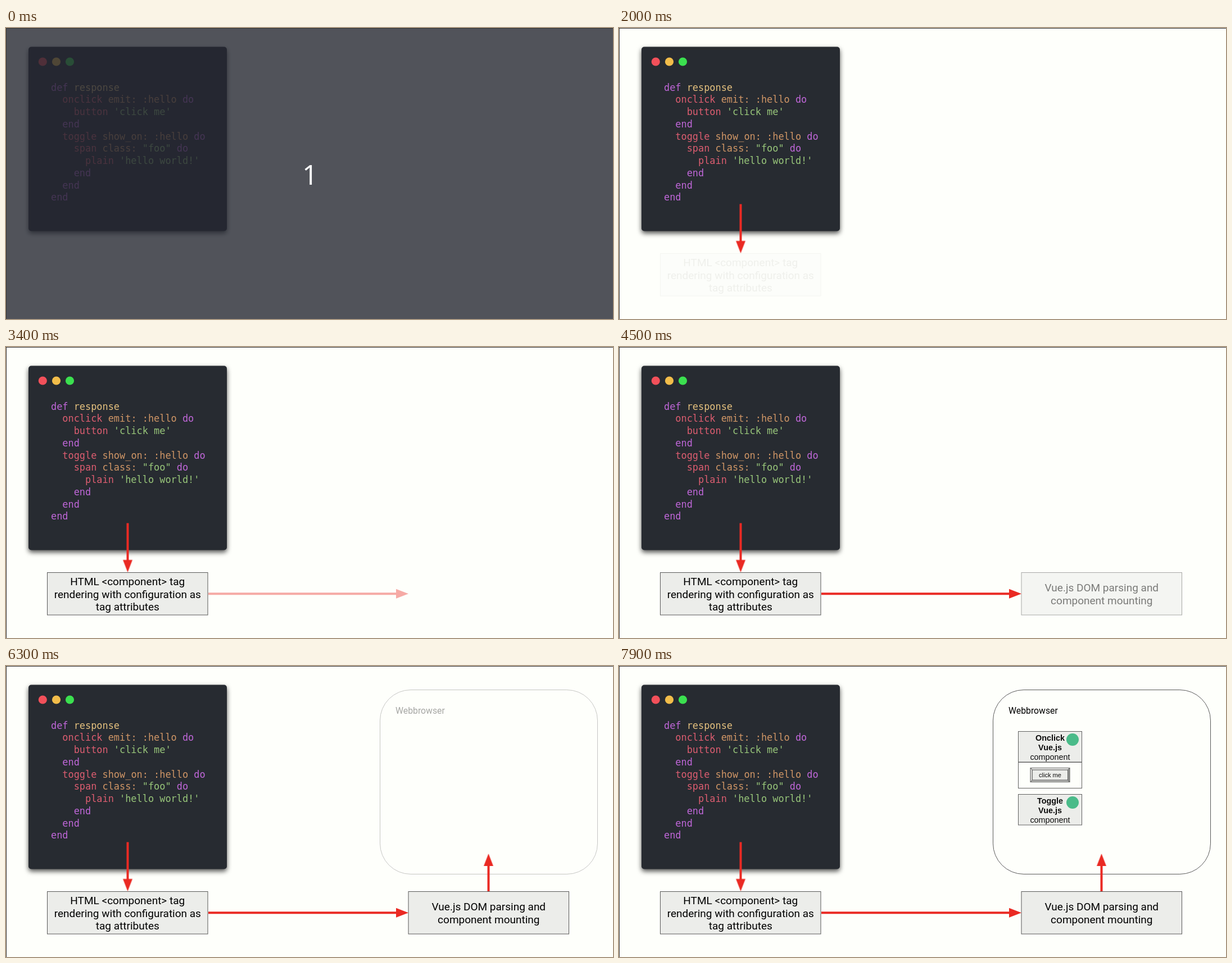
An HTML page that plays this animation: 1080x518 px, repeating every 8 s.

```html
<!DOCTYPE html>
<html lang="en">
<head>
<meta charset="utf-8">
<title>Component rendering flow</title>
<style>
  html, body { margin: 0; width: 100%; height: 100%; overflow: hidden; background: #fefffb; }
  svg { display: block; width: 100vw; height: 100vh; }
  .panel { fill: #272b31; filter: drop-shadow(0 4px 4px rgba(0, 0, 0, .68)); }
  .code { font: 16.9px "DejaVu Sans Mono", monospace; white-space: pre; }
  .k { fill: #c067d9; } .f { fill: #e6c27f; } .c { fill: #dc5d70; }
  .a { fill: #d09666; } .s { fill: #98c67a; }
  .box { fill: #ecedea; stroke: #595959; }
  .hollow { fill: #fefffb; stroke: #595959; }
  .label { font: 19px Roboto, sans-serif; text-anchor: middle; }
  .title { font: 15.8px Roboto, sans-serif; }
  .small { font: 14.4px "Liberation Sans", Arial, sans-serif; text-anchor: middle; }
  .bold { font-weight: bold; }
  .btn { font: 11.1px "Liberation Sans", Arial, sans-serif; text-anchor: middle; }
  .count { font: 49px "Open Sans", sans-serif; fill: #fff; text-anchor: middle; }
  .arrow { fill: #ea2a23; }
  .bevel { stroke: #595959; stroke-linejoin: round; }
</style>
</head>
<body>
<svg id="stage" viewBox="0 0 1080 518"></svg>
<script>
const LOOP = 8000, FADE = 1000, TICKS = 80;

const esc = s => s.replace(/&/g, '&amp;').replace(/</g, '&lt;');
const text = (cls, x, y, s) => `<text class="${cls}" x="${x}" y="${y}">${esc(s)}</text>`;
const rect = (cls, x, y, w, h, r = 0) =>
  `<rect class="${cls}" x="${x}" y="${y}" width="${w}" height="${h}" rx="${r}"/>`;
const dot = (x, y, r, fill) => `<circle cx="${x}" cy="${y}" r="${r}" fill="${fill}"/>`;
const group = (id, body) => `<g id="${id}">${body}</g>`;

// Each token starts with its colour class and a bar.
const code = [
  ['k|def ', 'f|response'],
  ['c|  onclick ', 'a|emit: :hello ', 'k|do'],
  ['c|    button ', "s|'click me'"],
  ['k|  end'],
  ['c|  toggle ', 'a|show_on: :hello ', 'k|do'],
  ['c|    span ', 'a|class: ', 's|"foo" ', 'k|do'],
  ['c|      plain ', "s|'hello world!'"],
  ['k|    end'],
  ['k|  end'],
  ['k|end'],
];

function codeLine(tokens, row) {
  const spans = tokens.map(t => `<tspan class="${t[0]}">${esc(t.slice(2))}</tspan>`).join('');
  return `<text class="code" x="80" y="${111.7 + row * 21.75}">${spans}</text>`;
}

// An arrow of the given length, pointing right before it is turned.
const arrow = (x, y, len, turn) =>
  `<path class="arrow" transform="translate(${x} ${y}) rotate(${turn})"
    d="M0 -2H${len - 22}V-8.5L${len} 0L${len - 22} 8.5V2H0Z"/>`;

function labelBox(x, lines) {
  const top = 446.7 - (lines.length - 1) * 11.25;
  return rect('box', x, 401.5, 285.5, 75.5) +
    lines.map((s, i) => text('label', x + 142.8, top + i * 22.5, s)).join('');
}

const component = (y, name) =>
  rect('box', 710.5, y, 113, 54.5) +
  text('small bold', 767, y + 16.5, name) +
  text('small bold', 767, y + 33, 'Vue.js') +
  text('small', 767, y + 50, 'component') +
  dot(807, y + 14.5, 11, '#41b883');

function button(x, y, w, h, b) {
  const side = (fill, d) => `<path class="bevel" fill="${fill}" d="${d}"/>`;
  const iw = w - 2 * b, ih = h - 2 * b;
  return side('#f0f0ee', `M${x} ${y}h${w}l${-b} ${b}h${-iw}z`) +
    side('#d6d7d4', `M${x} ${y}v${h}l${b} ${-b}v${-ih}z`) +
    side('#bdbebb', `M${x} ${y + h}h${w}l${-b} ${-b}h${-iw}z`) +
    side('#8e8f8d', `M${x + w} ${y}v${h}l${-b} ${-b}v${-ih}z`) +
    rect('box', x + b, y + b, iw, ih) +
    text('btn', x + w / 2, y + h / 2 + 4, 'click me');
}

document.getElementById('stage').innerHTML =
  rect('panel', 40, 33.5, 353, 328, 5) +
  dot(65.3, 60, 7.6, '#f2505a') + dot(89.5, 60, 7.6, '#f2bd4a') + dot(113.5, 60, 7.6, '#3be04f') +
  code.map(codeLine).join('') +
  group('browser',
    rect('hollow', 665.5, 42.5, 387, 328, 54.6) + text('title', 693, 84.7, 'Webbrowser')) +
  group('parts',
    component(116.5, 'Onclick') + rect('hollow', 710.5, 171.5, 113, 46) +
    button(732, 181.5, 70, 25, 3.5) + component(228.5, 'Toggle')) +
  group('render',
    labelBox(73.5, ['HTML <component> tag', 'rendering with configuration as', 'tag attributes'])) +
  group('mount', labelBox(716, ['Vue.js DOM parsing and', 'component mounting'])) +
  group('down', arrow(216.5, 313.5, 87.5, 90)) +
  group('across', arrow(360, 439.3, 356, 0)) +
  group('up', arrow(858.5, 401, 67, -90)) +
  group('cover',
    '<path fill="rgba(37,40,49,.795)" d="M1 1H1080V518H1z"/>' + text('count', 541, 279, '1')) +
  '<path fill="#333" d="M0 0H1080V1H1V518H0z"/>';

// The whole loop advances in ticks of 100 ms.
function play(id, frames) {
  document.getElementById(id).animate(
    frames.map(([ms, opacity]) => ({ offset: ms / LOOP, opacity })),
    { duration: LOOP, iterations: Infinity, delay: -2, easing: `steps(${TICKS}, end)` });
}

const fades = {
  down: 880, render: 1945, across: 3005, mount: 3980, up: 4965, browser: 5955, parts: 6950,
};
for (const [id, start] of Object.entries(fades)) {
  play(id, [[0, 0], [start, 0], [start + FADE, 1], [LOOP, 1]]);
}
play('cover', [[0, 1], [50, 1], [50, 0], [LOOP, 0]]);
</script>
</body>
</html>
```
